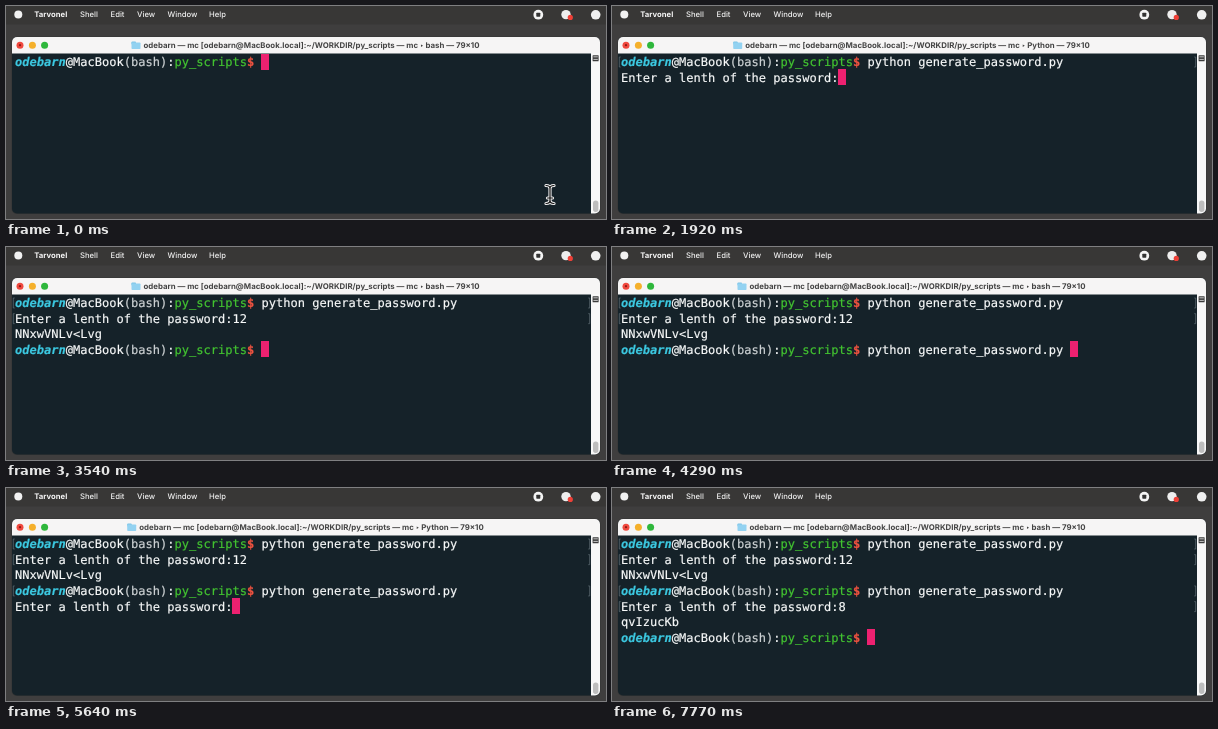
Recreate the animation shown at these times as an HTML page with a canvas. Size 600x213 px, loop 7.8 s.

```html
<!DOCTYPE html>
<html lang="en">
<head>
<meta charset="utf-8">
<title>Password script in a shell window</title>
<style>
html, body { margin: 0; width: 600px; height: 213px; overflow: hidden; background: #3b3a3a; }
canvas { display: block; }
</style>
</head>
<body>
<canvas id="stage" width="600" height="213"></canvas>
<script>
const ctx = document.getElementById('stage').getContext('2d');
const LOOP = 7800;
const CELL = 7.25, ROW = 15.65, LEFT = 9, TOP = 48;
const MONO = '"DejaVu Sans Mono", monospace';
const SANS = 'Inter, sans-serif';
const USER = 'odebarn';
const COMMAND = 'python generate_password.py ';
const QUESTION = 'Enter a lenth of the password:';
const PROMPT = [
  [USER, '#3cc8e0', 'italic bold'],
  ['@MacBook', '#f8fafa'],
  ['(bash)', '#cdd2d4'],
  [':', '#f8fafa'],
  ['py_scripts', '#43c531'],
  ['$', '#ee5340', 'bold'],
  [' ', '#fff']
];

// Each run: key times of the command, the question and the answer.
const RUNS = [
  { keys: 90, step: 66, typed: 8, full: 660, enter: 1230, ask: 1320,
    answer: '12', answerAt: 2190, done: 2520, result: 'NNxwVNLv<Lvg' },
  { keys: 3600, step: 1, typed: 0, full: 3600, enter: 4800, ask: 4890,
    answer: '8', answerAt: 6060, done: 6570, result: 'qvIzucKb' }
];

function box(x, y, w, h, color, r = 0) {
  ctx.fillStyle = color;
  ctx.beginPath();
  ctx.roundRect(x, y, w, h, r);
  ctx.fill();
}

function dot(x, y, r, color) {
  ctx.fillStyle = color;
  ctx.beginPath();
  ctx.arc(x, y, r, 0, Math.PI * 2);
  ctx.fill();
}

function label(text, x, y, size, weight, color) {
  ctx.font = `${weight} ${size}px ${SANS}`;
  ctx.fillStyle = color;
  ctx.fillText(text, x, y);
}

// A hairline stroke gives the glyphs the heavier look of the window's text.
function cells(text, col, row, color = '#f8fafa', style = '') {
  ctx.font = `${style} 12.04px ${MONO}`;
  ctx.fillStyle = ctx.strokeStyle = color;
  ctx.lineWidth = 0.2;
  const y = TOP + row * ROW + 12;
  [...text].forEach((ch, i) => {
    const x = LEFT + (col + i) * CELL;
    ctx.fillText(ch, x, y);
    ctx.strokeText(ch, x, y);
  });
  return col + text.length;
}

function marks(row) {
  const y = TOP + row * ROW + 3;
  ctx.strokeStyle = '#66747b';
  ctx.lineWidth = 0.7;
  ctx.beginPath();
  for (const [x, d] of [[7.3, 1.4], [583.7, -1.4]]) {
    ctx.moveTo(x + d, y);
    ctx.lineTo(x, y);
    ctx.lineTo(x, y + 10);
    ctx.lineTo(x + d, y + 10);
  }
  ctx.stroke();
}

function commandAt(run, t) {
  if (t >= run.full) return COMMAND;
  const n = Math.floor((t - run.keys) / run.step) + 1;
  return COMMAND.slice(0, Math.max(0, Math.min(run.typed, n)));
}

function answerAt(run, t) {
  const n = Math.floor((t - run.answerAt) / 150) + 1;
  return run.answer.slice(0, Math.max(0, n));
}

function shell(t) {
  let row = 0, col = 0;
  const prompt = () => {
    col = 0;
    for (const [text, color, style] of PROMPT) col = cells(text, col, row, color, style);
  };
  prompt();
  for (const run of RUNS) {
    col = cells(commandAt(run, t), col, row);
    if (t < run.enter) break;
    marks(row++);
    col = 0;
    if (t < run.ask) break;
    col = cells(QUESTION + answerAt(run, t), 0, row);
    if (t < run.done) break;
    marks(row++);
    cells(run.result, 0, row++);
    prompt();
  }
  box(Math.floor(LEFT + col * CELL), Math.floor(TOP + row * ROW), 8, 16, '#ed2170');
}

function menuBar() {
  dot(12.3, 8.4, 4, '#f2f2f2');
  label('Tarvonel', 28.3, 11.3, 7.7, 700, '#f8f8f8');
  const items = [['Shell', 74], ['Edit', 104.5], ['View', 131], ['Window', 161.5], ['Help', 203]];
  for (const [text, x] of items) label(text, x, 11.3, 7.7, 500, '#f2f2f2');
  dot(532.3, 8.7, 4.9, '#f4f4f4');
  box(530.3, 6.7, 4, 4, '#333', 0.6);
  dot(560, 8.6, 4.7, '#eeeeee');
  dot(564.3, 11.4, 2.6, '#ee4037');
  dot(589.7, 8.8, 4.8, '#f0f0f0');
}

function titleBar(t) {
  [['#f0493f', 14], ['#f5b02b', 26.4], ['#2fb73c', 38.6]].forEach(([c, x]) => dot(x, 39.2, 3.5, c));
  dot(14, 39.2, 1.1, '#8c1a12');
  const busy = RUNS.some(r => t >= r.enter && t < r.done);
  const text = `${USER} — mc [${USER}@MacBook.local]:~/WORKDIR/py_scripts — mc ‣ ${busy ? 'Python' : 'bash'} — 79×10`;
  ctx.font = `700 7.85px ${SANS}`;
  const x = 305.5 - ctx.measureText(text).width / 2;
  label(text, x, 42, 7.85, 700, '#444');
  box(x - 12, 35.5, 4.5, 3, '#7cc4e6', 0.8);
  box(x - 12, 36.4, 9, 6.6, '#93d2f1', 0.8);
}

function scrollBar() {
  box(585, 47, 9, 160.5, '#f8f8f8', [0, 0, 5, 0]);
  box(586.6, 49.2, 6, 6, '#3c3c3c', 0.5);
  box(587.4, 50.4, 4.4, 0.9, '#d8d8d8');
  box(587.4, 52.9, 4.4, 0.9, '#d8d8d8');
  box(587, 194.5, 5.4, 11.5, '#bdbdbd', 2.7);
}

function pointer(x, y) {
  const beam = () => {
    ctx.beginPath();
    ctx.moveTo(x - 4, y - 9);
    ctx.quadraticCurveTo(x, y - 9, x, y - 6);
    ctx.quadraticCurveTo(x, y - 9, x + 4, y - 9);
    ctx.moveTo(x, y - 6);
    ctx.lineTo(x, y + 6);
    ctx.moveTo(x - 4, y + 9);
    ctx.quadraticCurveTo(x, y + 9, x, y + 6);
    ctx.quadraticCurveTo(x, y + 9, x + 4, y + 9);
    ctx.moveTo(x - 2.5, y + 3.5);
    ctx.lineTo(x + 2.5, y + 3.5);
    ctx.stroke();
  };
  ctx.lineCap = 'round';
  for (const [width, color] of [[3.2, '#f4f4f4'], [1.2, '#111']]) {
    ctx.lineWidth = width;
    ctx.strokeStyle = color;
    beam();
  }
  ctx.lineCap = 'butt';
}

function draw(t) {
  ctx.textRendering = 'geometricPrecision';
  box(0, 0, 600, 213, '#3f3e3e');
  box(0, 0, 600, 18.5, '#383736');
  menuBar();
  box(5.5, 30.5, 589, 177.5, '#343434', 5.5);
  box(6, 31, 588, 176.5, '#152229', 5);
  box(6, 31, 588, 16.5, '#f6f5f5', [5, 5, 0, 0]);
  titleBar(t);
  scrollBar();
  shell(t);
  if (t < RUNS[0].keys) pointer(544, 188.5);
}

const start = performance.now();
function tick() {
  draw((performance.now() - start) % LOOP);
  requestAnimationFrame(tick);
}
tick();
</script>
</body>
</html>
```
